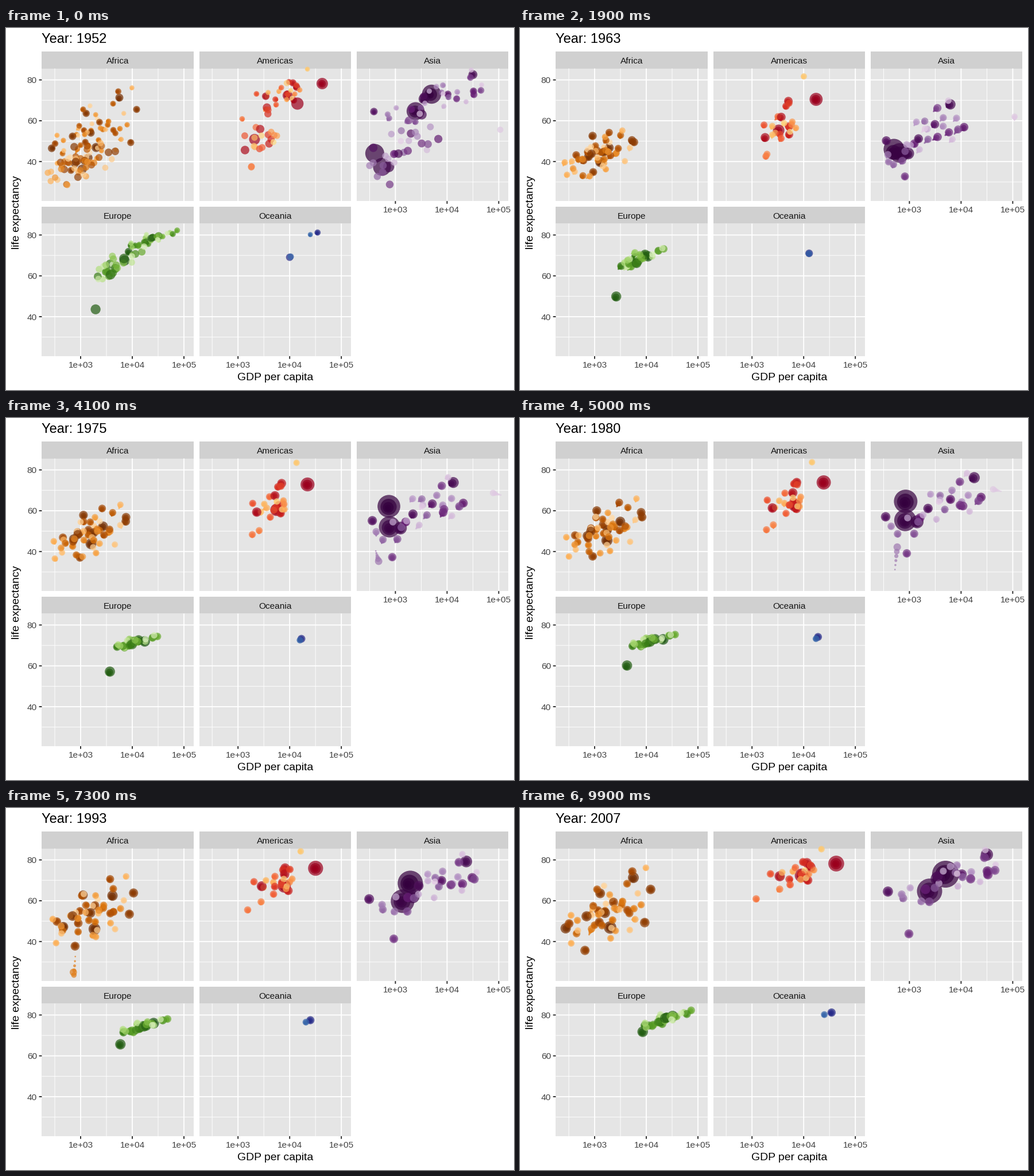
Recreate the animation shown at these times as a matplotlib script. Size 885 px wide and 632 px high, loop 10 s.

```python
import numpy as np
import matplotlib.pyplot as plt
from matplotlib.animation import FuncAnimation
from matplotlib.colors import LinearSegmentedColormap, to_rgb
from matplotlib.patches import Rectangle

W, H, DPI, FRAMES = 885, 632, 100, 100
START, END = 1952, 2007
WAKE = 5
PX = 72 / DPI

plt.rcParams["font.family"] = "Liberation Sans"
fig = plt.figure(figsize=(W / DPI, H / DPI), dpi=DPI, facecolor="white")
ax = fig.add_axes([0, 0, 1, 1])
ax.set(xlim=(0, W), ylim=(H, 0))
ax.axis("off")


def label(x, y, text, size, color="black", **kw):
    kw = dict(ha="center", va="baseline") | kw
    return ax.text(x, y, text, fontsize=size * PX, color=color, **kw)


def rule(x, y, width, color):
    ax.plot(x, y, color=color, lw=width * PX, solid_capstyle="butt", snap=False, zorder=2)


def box(x, y, w, h, color):
    ax.add_patch(Rectangle((x, y), w, h, fc=color, lw=0, zorder=1))


def year_at(frame):
    return START + (END - START) * frame / (FRAMES - 1)


years = year_at(np.arange(FRAMES))
rng = np.random.default_rng(7)


def scores(n):
    """Random normal scores with mean 0 and deviation 1."""
    z = rng.normal(size=n)
    return np.clip((z - z.mean()) / z.std(), -2, 2.2)


def wander(n, step):
    """Small kinks every five years, linear in between."""
    knots = np.arange(START, END + 1, 5)
    noise = rng.normal(0, step, (n, len(knots)))
    return np.array([np.interp(years, knots, row) for row in noise])


class Panel:
    """One facet: frame, grid, colour ramp and the paths of its bubbles."""

    def __init__(self, title, left, top, ramp, growth, x_axis, y_axis):
        self.left, self.top, self.growth = left, top, growth
        self.ramp = LinearSegmentedColormap.from_list(
            title, [np.array(to_rgb(c)) ** 1.15 for c in ramp])
        self.pops, self.gdp, self.life = [], [], []
        w, h = 264.6, 231.5
        box(left, top - 29.5, w, 29.5, "#d0d0d0")
        box(left, top, w, h, "#e5e5e5")
        label(left + w / 2, top - 8.6, title, 15.4, "#141414")
        for step, width in ((0.5, 0.95), (0, 1.9)):
            for k in range(3):
                x, y = self.px(3 + k - step), self.py(40 + 20 * (k - step))
                rule([x, x], [top, top + h], width, "white")
                rule([left, left + w], [y, y], width, "white")
        for k in range(3):
            x, y = self.px(3 + k), self.py(40 + 20 * k)
            if x_axis:
                rule([x, x], [top + h, top + h + 4.8], 1.9, "#2b2b2b")
                label(x, top + h + 20.3, f"1e+0{3 + k}", 15.4, "#424242")
            if y_axis:
                rule([left - 4.8, left], [y, y], 1.9, "#2b2b2b")
                label(left - 8.5, y + 5.5, str(40 + 20 * k), 15.4, "#424242", ha="right")

    def px(self, log_gdp):
        return self.left + 67.6 + 90 * (log_gdp - 3)

    def py(self, life):
        return self.top + 20 + 3.565 * (80 - life)

    def lead(self, pop, *keys, at=(START, 1980, END)):
        """A standout bubble through a few (log gdp, life) key points."""
        gdp, life = zip(*keys)
        self.pops.append(pop)
        self.gdp.append(np.interp(years, at, gdp))
        self.life.append(np.interp(years, at, life))

    def cloud(self, n, pop, corr, *trend):
        """A seeded cloud; trend holds (log gdp, spread, life, spread) over time."""
        at = np.linspace(START, END, len(trend))
        gdp, gdp_sd, life, life_sd = (np.interp(years, at, col) for col in zip(*trend))
        turn = 0.6 * (years - START) / (END - START)

        def drift():
            return np.outer(scores(n), np.cos(turn)) + np.outer(scores(n), np.sin(turn))

        wealth = drift()
        health = corr * wealth + np.sqrt(1 - corr ** 2) * drift()
        self.gdp += list(gdp + gdp_sd * wealth + wander(n, 0.02))
        self.life += list(life + life_sd * health + wander(n, 0.3))
        self.pops += list(np.minimum(pop * np.exp(1.1 * scores(n)), 60))

    def tracks(self):
        """Positions and symbol sizes, indexed by bubble then frame."""
        share = self.growth + (1 - self.growth) * (years - START) / (END - START)
        sizes = 2 + 10 * np.sqrt(np.outer(self.pops, share) / 1318)
        return self.px(np.array(self.gdp)), self.py(np.array(self.life)), sizes

    def colors(self):
        rank = np.argsort(np.argsort(-np.array(self.pops)))
        return self.ramp(rank / (len(rank) - 1))


L, M, R, TOP, LOW = 62.4, 336.6, 610.8, 70.6, 341.4
africa = Panel("Africa", L, TOP, ("#7f3b08", "#b35806", "#e08214", "#fdb863", "#fee0b6"), .27, 0, 1)
americas = Panel("Americas", M, TOP, ("#a50026", "#d73027", "#f46d43", "#fdae61", "#fee090"), .42, 0, 0)
asia = Panel("Asia", R, TOP, ("#40004b", "#762a83", "#9970ab", "#c2a5cf", "#e7d4e8"), .39, 1, 0)
europe = Panel("Europe", L, LOW, ("#276419", "#4d9221", "#7fbc41", "#b8e186", "#e6f5d0"), .75, 1, 1)
oceania = Panel("Oceania", M, LOW, ("#313695", "#4575b4"), .45, 1, 0)

africa.lead(135, (3.03, 36.3), (3.24, 45.5), (3.30, 46.9))
africa.lead(80, (3.15, 41.9), (3.50, 54.8), (3.75, 71.3))
africa.lead(65, (2.89, 39.1), (2.86, 47.8), (2.44, 46.5))
africa.lead(44, (3.67, 45), (3.92, 57), (3.97, 49.3))
africa.lead(9, (2.69, 40), (2.93, 44), (2.87, 23.6), (2.77, 36), (2.94, 46.2),
            at=(START, 1987, 1992, 1997, END))
africa.cloud(47, 8, .55, (2.97, .3, 39, 5), (3.15, .33, 47, 6),
             (3.18, .38, 53.5, 7.5), (3.25, .4, 55, 8.5))

americas.lead(301, (4.15, 68.4), (4.39, 73.9), (4.63, 78.2))
americas.lead(190, (3.32, 50.9), (3.84, 62.6), (3.96, 72.4))
americas.lead(8.5, (3.26, 37.6), (3.28, 50.8), (3.08, 60.9))
americas.cloud(22, 9, .6, (3.49, .2, 53.5, 8.5), (3.68, .2, 62.5, 6.5),
               (3.77, .22, 68.5, 4.5), (3.9, .25, 73.8, 3.5))

asia.lead(1318, (2.6, 44), (2.69, 44.5), (2.79, 58.4), (2.93, 64.7), (3.70, 73),
          at=(START, 1962, 1967, 1980, END))
asia.lead(1110, (2.74, 37.4), (2.92, 55.5), (3.39, 64.7))
asia.lead(223, (2.87, 37.5), (3.15, 54.7), (3.55, 70.7))
asia.lead(127, (3.51, 63), (4.26, 76.3), (4.50, 82.6))
asia.lead(32, (2.89, 28.8), (2.95, 39.2), (2.99, 43.8))
asia.lead(14, (2.57, 39.4), (2.62, 40.3), (2.72, 31.2), (2.80, 51), (3.23, 59.7),
          at=(START, 1972, 1977, 1982, END))
asia.lead(2.5, (5.03, 55.6), (5.04, 67.7), (4.50, 71.3), (4.67, 77.6),
          at=(START, 1972, 1982, END))
asia.cloud(26, 16, .7, (3.15, .35, 47.5, 8), (3.47, .45, 57.5, 7.5),
           (3.68, .5, 66, 6.5), (3.82, .5, 71, 5.5))

europe.lead(71, (3.29, 43.6), (3.63, 60.3), (3.93, 71.8))
europe.lead(82, (3.85, 67.5), (4.33, 73), (4.51, 79.4))
europe.cloud(28, 9, .85, (3.67, .24, 65, 5), (3.99, .2, 70.8, 2),
             (4.16, .22, 73.7, 2.3), (4.36, .22, 77.9, 2.6))

oceania.lead(20, (4.0, 69.1), (4.28, 74.2), (4.54, 81.2))
oceania.lead(4, (4.02, 69.4), (4.24, 73.3), (4.40, 80.2))

title = label(62, 26, "", 23.6, ha="left")
label(469, 615, "GDP per capita", 19.35)
label(23, 321.5, "life expectancy", 19.35, rotation=90, rotation_mode="anchor")

panels = (africa, americas, asia, europe, oceania)
xs, ys, sizes = (np.concatenate(part) for part in zip(*(p.tracks() for p in panels)))
tints = np.tile(np.concatenate([p.colors() for p in panels]), (WAKE + 1, 1))
tints[:, 3] = 0.7
dots = ax.scatter(np.zeros(len(tints)), np.zeros(len(tints)), c=tints, linewidths=0, zorder=3)


def update(frame):
    # The wake shrinks quadratically and wraps round the loop.
    spots, radii = [], []
    for back in range(WAKE, -1, -1):
        i = (frame - back) % FRAMES
        spots.append(np.column_stack((xs[:, i], ys[:, i])))
        radii.append(1.2 + 1.86 * sizes[:, i] * (1 - back / (WAKE + 1)) ** 2)
    dots.set_offsets(np.concatenate(spots))
    dots.set_sizes((2 * PX * np.concatenate(radii)) ** 2)
    title.set_text(f"Year: {year_at(frame):.0f}")
    return dots, title


anim = FuncAnimation(fig, update, frames=FRAMES, interval=100, repeat=True, repeat_delay=0)
plt.show()
```
